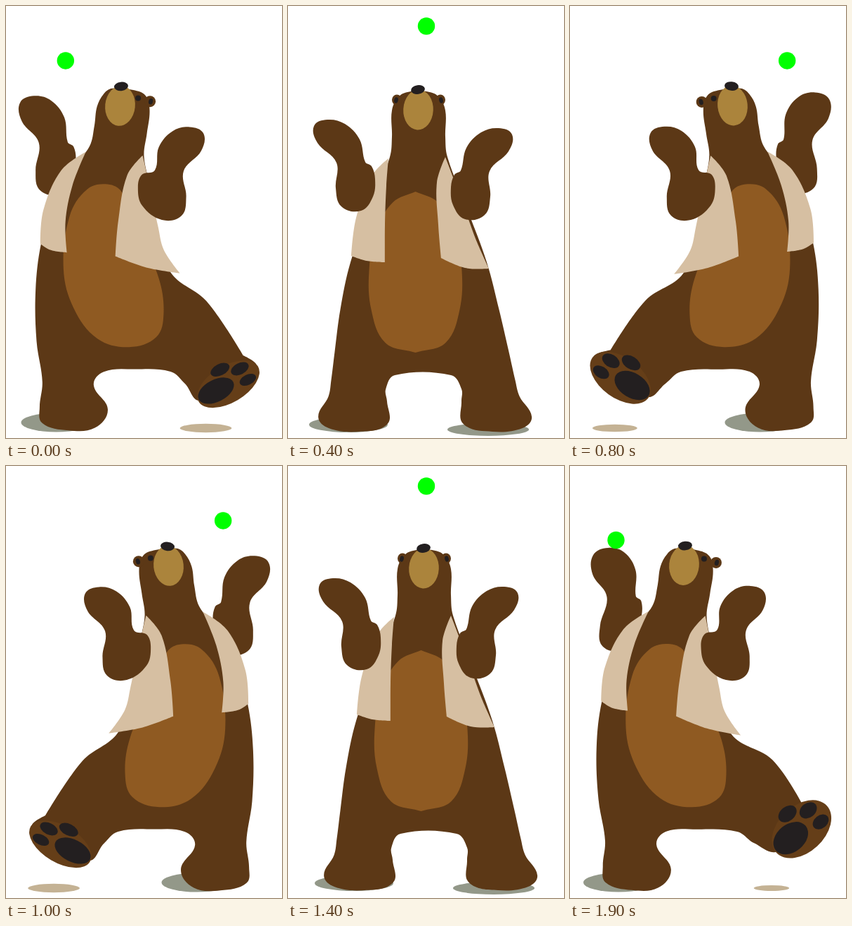
Animation of 393 by 612 pixels, one loop 2000 ms. Source, as an HTML page:

```html
<!DOCTYPE html>
<html lang="en">
<head>
<meta charset="utf-8">
<title>Juggling bear</title>
<style>
  html, body { margin: 0; width: 100%; height: 100%; overflow: hidden; background: #fff; }
  svg { display: block; width: 100%; height: 100%; }
</style>
</head>
<body>
<svg viewBox="0 0 393 612"><g id="shadows"></g><g id="bear"></g><circle id="ball" r="12.2" fill="#0f0"/></svg>
<script>
const W = 393, STEP = 100, STEPS = 20, HALF = STEPS / 2;
const FUR = '#5c3816', DARK = '#231f20', VEST = '#d6bfa2', BELLY = '#8f5a22', SNOUT = '#ab843c', SOLE = '#653e18';
const SHADE = [147, 152, 137], FAINT = [196, 178, 148];

const lerp = (a, b, k) => a + (b - a) * k;

// Outlines are "x,y" points joined by a smooth curve; "!" marks a corner.
const points = text => text.split(' ').map(item => {
  const [x, y] = item.split(',').map(parseFloat);
  return { x, y, corner: item.endsWith('!') };
});

// Right arm around its elbow; the left arm is its mirror image.
const arm = points('40,-117 59,-108 54,-84 27,-56 28,-20 20,6 -8,12 -25,-8 -28,-33 -23,-51 -14,-57 -6,-89 15,-111');

const lean = {
  back: points('243,373 216,305 210,255 200,212 203,180 206,147 200,127 182,119 152,117 140,125 131,143 128,170 122,200 ' +
    '100,230 75,275 58,344 50,410 49,480 55,535 50,570 53,592 90,602 128,598 147,572 128,538 143,519 187,514'),
  vestL: points('117,208! 83,236 60,295 57,344! 72,352 95,354! 92,310 100,257'),
  vestR: points('198,211! 206,240 224,310 233,342 256,373! 208,368 164,355! 167,305 177,240'),
  belly: points('147,253 168,264 195,325 222,385 228,435 217,468 178,483 133,472 100,430 86,375 94,300 118,261')
};

// The front view's body and belly are half outlines around a middle line.
const front = {
  body: points('11,121 28,128 38,148 38,185 41,214 70,290 97,363 113,430 124,490 131,530 136,553 152,582 138,598 95,603 54,592 53,560 54,543 40,523'),
  belly: points('0,263 32,278 56,318 66,375 63,430 43,477 0,491'),
  vestL: points('143,216! 120,240 97,300 90,354! 112,361 138,363! 138,310 140,255'),
  vestR: points('224,214! 236,245 258,305 268,332 286,372! 252,371 218,357! 214,310 212,250')
};

function curve(pts) {
  const n = pts.length, at = i => pts[(i + n) % n];
  const dirs = pts.map((p, i) => {
    if (p.corner) return [0, 0];
    const dx = at(i + 1).x - at(i - 1).x, dy = at(i + 1).y - at(i - 1).y, len = Math.hypot(dx, dy) || 1;
    return [dx / len, dy / len];
  });
  let d = `M${pts[0].x} ${pts[0].y}`;
  pts.forEach((p, i) => {
    const q = at(i + 1), [ux, uy] = dirs[i], [vx, vy] = dirs[(i + 1) % n];
    const r = Math.hypot(q.x - p.x, q.y - p.y) * .36;
    d += `C${p.x + ux * r} ${p.y + uy * r} ${q.x - vx * r} ${q.y - vy * r} ${q.x} ${q.y}`;
  });
  return d + 'Z';
}

const shape = (pts, fill) => `<path d="${curve(pts)}" fill="${fill}"/>`;
const oval = (x, y, rx, ry, fill, turn = 0) =>
  `<ellipse rx="${rx}" ry="${ry}" fill="${fill}" transform="translate(${x} ${y}) rotate(${turn})"/>`;

function unfold(half, middle) {
  const side = s => half.map(p => ({ x: middle(p.y) + s * p.x, y: p.y }));
  return [...side(1), ...side(-1).reverse()];
}

// Bends the forearm by (bx, by) in proportion to the height above the elbow.
function drawArm(side, x, y, bx, by, shoulder) {
  return shape(arm.map(p => {
    const up = Math.max(0, -p.y) / 115;
    return { x: x + side * p.x * (p.x < -20 ? shoulder : 1) + bx * up, y: y + p.y + by * up };
  }), FUR);
}

// Swings the hips left and tips the torso as the leg goes up.
const tilt = (pts, amount) => pts.map(p => {
  const pull = amount * Math.exp(-(((p.y - 370) / 170) ** 2));
  return { ...p, x: p.x - 13 * pull, y: p.y + (p.x - 170) * .1 * pull };
});

const head = (x, y, turn) => oval(x, y, 21.3, 28.5, SNOUT, turn);

function drawLean(lift) {
  const foot = { x: lerp(293, 330, lift), y: lerp(574, 514, lift), ry: lerp(14, 33, lift), turn: lerp(-8, -43, lift) };
  const a = foot.turn * Math.PI / 180, cos = Math.cos(a), sin = Math.sin(a);
  const onFoot = (x, y) => ({ x: foot.x + x * cos - y * sin, y: foot.y + x * sin + y * cos });
  const leg = [
    { x: 228 + 10 * lift, y: 518 }, { x: 242 + 20 * lift, y: 537 - 3 * lift },
    onFoot(-46, 0), onFoot(46, 0),
    { ...onFoot(44 - 20 * lift ** 3, -24), corner: true },
    { x: 280 + 8 * lift, y: 421 - 5 * lift }
  ];

  let sole = oval(foot.x, foot.y, 49, foot.ry, lift > .4 ? SOLE : FUR, foot.turn);
  if (lift > .4) {
    const pad = (x, y, rx, ry) => {
      const p = onFoot(x, y * foot.ry / 30);
      return oval(p.x, p.y, rx, ry * foot.ry, DARK, foot.turn + 4);
    };
    sole += pad(-20, -1, 27.5, .6) + pad(0, -27, 14.5, .31) + pad(25, -12, 13.5, .31) + pad(27, 10, 12.5, .28);
  }

  const ear = { x: 200 + 8 * lift, y: 132 + 5 * lift }, rise = 2.5 * lift;
  return drawArm(-1, 72 - 6 * lift, 265 - 16 * lift, 28 * lift * lift, -16 * lift, 1) +
    shape([...tilt(lean.back, lift), ...leg], FUR) + sole +
    shape(tilt(lean.belly, lift / 2), BELLY) +
    shape(tilt(lean.vestL, lift), VEST) + shape(tilt(lean.vestR, lift), VEST) +
    drawArm(1, 230, 291, -13 * lift, -4 * lift, 1.42) +
    oval(ear.x, ear.y, 8, 8, FUR) + oval(ear.x + 1, ear.y, 3, 4.3, DARK, 15) +
    oval(ear.x - 17, ear.y - 3 - rise, 4, 4, DARK) +
    head(162.5, 143 - rise, 6) + oval(164, 115.5 - rise, 10, 6.3, DARK, -6);
}

function drawFront() {
  const ears = [-1, 1].map(s => oval(186 + s * 31, 133, 7, 7.5, FUR) + oval(186 + s * 32, 133.5, 2.8, 4.2, DARK, -15 * s));
  return shape(unfold(front.body, y => 186 + Math.max(0, y - 400) * .05), FUR) +
    shape(unfold(front.belly, () => 181.5), BELLY) +
    shape(front.vestL, VEST) + shape(front.vestR, VEST) +
    drawArm(-1, 96, 278, 0, 0, 1) + drawArm(1, 260, 290, 0, 0, 1) +
    ears.join('') + head(185.5, 147, 3) + oval(185, 118.5, 10, 6.3, DARK, -8);
}

// The light stays put, so shadows fall to the left of the feet on both sides.
function drawShadows(isFront, mirrored, lift) {
  const grey = `rgb(${SHADE})`;
  if (isFront) return oval(86, 593, 56, 11, grey) + oval(285, 600, 58, 9, grey);
  const fade = `rgb(${SHADE.map((v, i) => Math.round(lerp(v, FAINT[i], Math.min(1, lift * 1.6))))})`;
  const down = 1 - lift;
  return oval((mirrored ? 269 : 69) + 7 * down, 590, 50, 13.5, grey) +
    oval(mirrored ? 58 + 28 * down : 287 - 7 * down, 598, lerp(58, 25, lift), lerp(10, 4, lift), fade);
}

const [shadows, bear, ball] = ['shadows', 'bear', 'ball'].map(id => document.getElementById(id));
let shown = -1;

function draw(ms) {
  const step = Math.floor(ms / STEP) % STEPS;
  if (step === shown) return;
  shown = step;

  // Each half loop: eight steps leaning to one side, then two facing front.
  const k = (step + 4) % HALF, isFront = k > 7, mirrored = step > 5 && step < 14;
  const lift = Math.max(0, Math.cos((k - 2.85) * .56)) ** 2;
  const slide = isFront && (k === 9) !== (step >= HALF) ? 8 : 0;
  const move = `translate(${slide} ${-slide / 4})`;
  shadows.innerHTML = drawShadows(isFront, mirrored, lift);
  shadows.setAttribute('transform', move);
  bear.innerHTML = isFront ? drawFront() : drawLean(lift);
  bear.setAttribute('transform', mirrored ? `translate(${W + 1} 0) scale(-1 1)` : move);

  // The ball runs back and forth along a parabola.
  const u = Math.abs((step + 1) % STEPS - HALF) / 5 - 1;
  ball.setAttribute('cx', 197 - 131.5 * lerp(u, Math.sin(u * Math.PI / 2), .35));
  ball.setAttribute('cy', 28.5 + 76.5 * u * u);
}

const start = performance.now();
function tick() {
  draw(performance.now() - start);
  requestAnimationFrame(tick);
}
tick();
</script>
</body>
</html>
```
